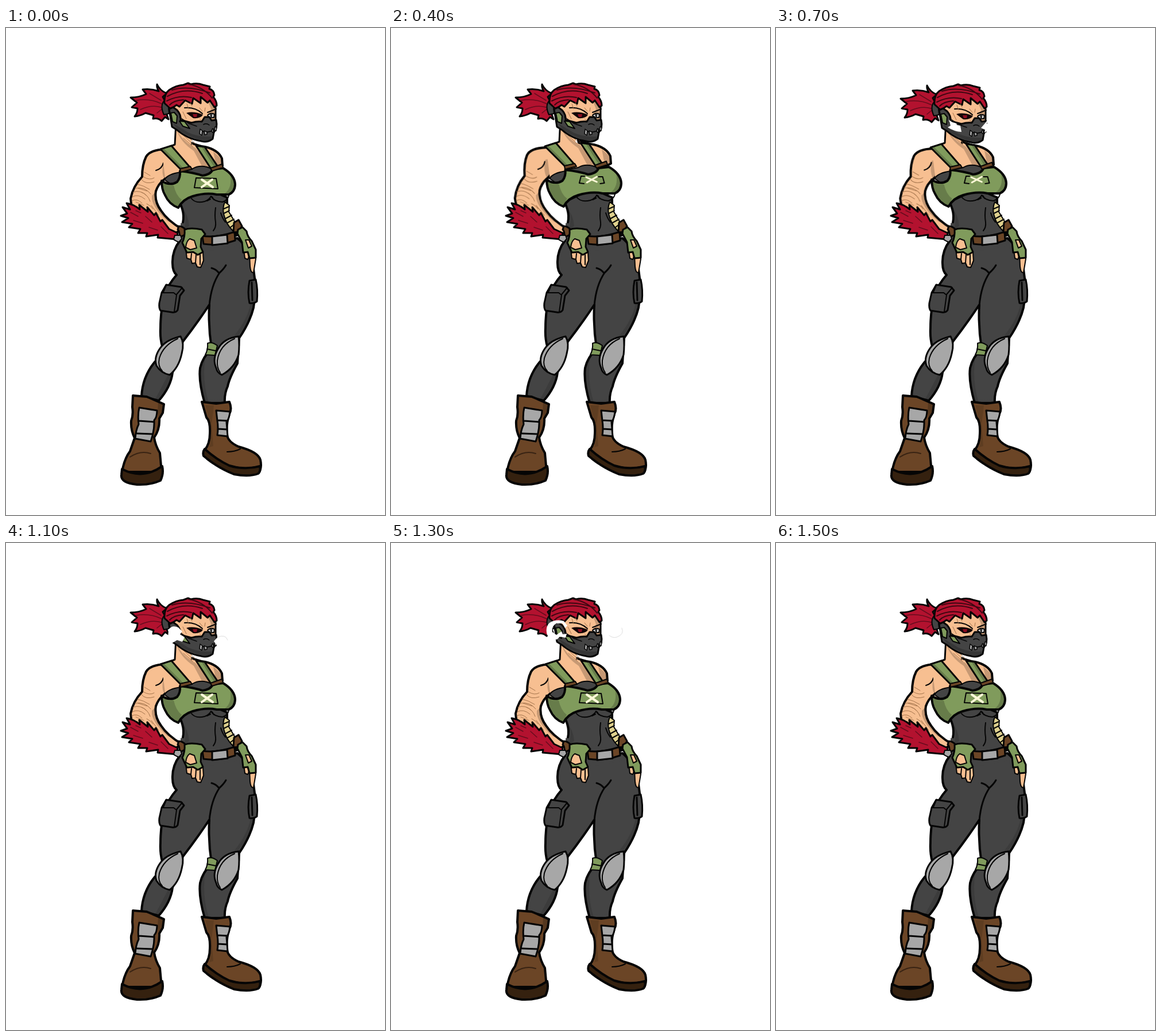
An HTML page that plays this animation: 660x848 px, repeating every 1600 ms.

```html
<!DOCTYPE html>
<html lang="en">
<head>
<meta charset="utf-8">
<title>Idle stance</title>
<style>
html, body { margin: 0; width: 100%; height: 100%; overflow: hidden; background: #fff; }
svg { display: block; width: 100vw; height: 100vh; }
path { stroke: #050505; stroke-width: 3; stroke-linejoin: round; stroke-linecap: round; fill: none; }
.skin { fill: #f7bf91; } .red { fill: #b3122f; } .suit { fill: #444; } .green { fill: #809b5c; }
.brown { fill: #6b4526; } .sole { fill: #35210f; } .steel { fill: #a7a7a7; } .wrap { fill: #dfd18e; }
.edge { stroke-width: 4; } .thin { stroke-width: 2; }
.fill, .shade, .smoke path { stroke: none; }
.shade { fill: #000; opacity: .2; }
.soft { opacity: .12; }
.hatch { stroke: #a4744c; stroke-width: 1; }
.crease { stroke: #650c1d; stroke-width: 1.5; }
.mark { stroke: #fff9d9; stroke-width: 4; }
.smoke path { fill: #fff; }
.smoke .wisp { fill: none; stroke: #ddd; stroke-width: 1; }

/* Every pose is held, then swapped */
.head, .arm, .chest, .far, .front, .rest, .rise, .smoke { animation: 1.6s step-end infinite; }
.head { animation-name: head; }
.arm { animation-name: arm; transform-origin: 218px 312px; }
.chest { animation-name: chest; }
.far { animation-name: far; }
.front { animation-name: front; transform-origin: 335px 280px; }
.rest { animation-name: rest; }
.rise { animation-name: rise; }
.smoke { visibility: hidden; }
.puff1 { animation-name: puff1; } .puff2 { animation-name: puff2; }
.puff3 { animation-name: puff3; } .puff4 { animation-name: puff4; }
.puff5 { animation-name: puff5; } .puff6 { animation-name: puff6; }
@keyframes head { 0%, 25%, 56.25% { transform: none } 12.5%, 43.75% { transform: translate(0, 2px) } }
@keyframes arm { 0%, 56.25% { transform: none } 12.5%, 43.75% { transform: skewX(2.5deg) scaleY(1.01) } 25% { transform: skewX(4.5deg) scaleY(1.03) } }
@keyframes chest { 0%, 56.25% { transform: none } 12.5%, 43.75% { transform: translate(0, -3px) } 25% { transform: translate(-1px, -5px) } }
@keyframes far { 0%, 56.25% { transform: none } 12.5%, 43.75% { transform: translate(2px, -2px) } 25% { transform: translate(6px, -4px) } }
@keyframes front { 0%, 56.25% { transform: none } 12.5%, 25%, 43.75% { transform: translate(1px, -2px) scale(1.015, 1) } }
@keyframes rest { 0%, 56.25% { visibility: visible } 12.5% { visibility: hidden } }
@keyframes rise { 0%, 56.25% { visibility: hidden } 12.5% { visibility: visible } }
@keyframes puff1 { 43.75% { visibility: visible } 56.25% { visibility: hidden } }
@keyframes puff2 { 56.25% { visibility: visible } 68.75% { visibility: hidden } }
@keyframes puff3 { 68.75% { visibility: visible } 75% { visibility: hidden } }
@keyframes puff4 { 75% { visibility: visible } 81.25% { visibility: hidden } }
@keyframes puff5 { 81.25% { visibility: visible } 87.5% { visibility: hidden } }
@keyframes puff6 { 87.5% { visibility: visible } 93.75% { visibility: hidden } }
</style>
</head>
<body>
<svg viewBox="0 0 660 848">

<!-- legs -->
<path class="suit edge" d="M303 370Q289 388 290 410Q290 424 297 430Q283 446 277 463Q269 490 269 522Q268 540 272 554L262 578Q238 605 236 641L266 649Q287 625 290 600L308 546Q332 515 354 482Q352 520 358 558Q342 574 338 592Q335 615 346 653L381 653Q380 637 386 624Q389 609 403 584L406 540Q425 512 431 487Q437 455 431 420Q427 386 403 366L345 376Z"/>
<path class="shade soft" d="M431 480Q425 512 403 537L398 535Q420 508 426 480ZM289 600Q284 628 265 648L260 646Q274 620 283 602ZM341 576Q334 605 347 652L353 652Q341 612 347 574Z"/>
<path d="M354 484Q357 448 372 426M358 418Q366 420 371 427Q379 420 383 413"/>
<path class="green thin" d="M351 549Q359 546 368 553L364 570L347 569Q352 560 351 549ZM350 559L365 562"/>
<path class="steel" d="M304 537Q278 543 268 558Q257 574 262 588Q270 601 285 604Q301 591 306 567Q311 549 304 537Z"/>
<path class="thin" d="M299 541Q274 552 267 575Q264 589 272 597"/>
<path class="steel" d="M405 537Q379 540 369 559Q359 576 366 592Q368 601 376 604Q398 592 405 569Q407 552 405 537Z"/>
<path class="thin" d="M398 541Q372 552 368 579Q367 592 373 600"/>
<path class="suit" d="M279 447L305 451L310 457L303 466L299 491Q296 496 289 495L269 492Q266 488 267 479L271 461Z"/>
<path class="thin" d="M271 461L292 461L297 465L293 494M279 448L274 460M297 464L307 452"/>
<path class="suit" d="M424 440L435 438Q439 456 437 476Q432 480 424 479Q420 461 424 440ZM428 443L429 474"/>

<!-- boots -->
<path class="brown edge" d="M221 640L245 642Q262 649 275 655L273 670L267 680Q268 699 258 713Q260 727 268 740L271 773L202 773Q206 750 216 737L224 714Q217 700 218 684Q222 674 220 660Z"/>
<path class="shade" d="M265 652L274 656L272 670L266 680L264 668Z"/>
<path class="sole edge" d="M202 768Q238 787 272 763Q275 776 269 788Q251 796 228 795Q199 792 201 778Z"/>
<path class="thin" d="M216 747Q234 735 252 741" style="stroke:#382313"/>
<path class="steel" d="M232 661L263 666Q263 678 258 683Q259 700 252 720L225 715Q226 700 231 690Q229 674 232 661ZM231 684L258 686M228 706L254 707"/>
<path class="brown edge" d="M341 651L366 654L389 651Q394 663 389 672Q383 689 385 709Q387 721 405 729Q439 738 443 752Q446 766 440 775L421 779Q382 775 350 750L346 735Q355 724 355 706Q356 685 349 678Z"/>
<path class="sole edge" d="M346 733Q367 752 389 762Q415 770 442 763Q444 772 439 776Q423 782 397 777Q367 765 344 745Q342 738 346 733Z"/>
<path class="shade soft" d="M347 657L362 657L358 690L361 728L354 730Q362 701 352 678Z"/>
<path class="thin" d="M385 738Q398 738 408 733"/>
<path class="steel" d="M366 666L390 668Q389 680 384 686L386 711L368 709Q370 696 368 684ZM368 683L386 684M369 698L385 699"/>

<!-- waist -->
<path class="suit edge" d="M302 303Q315 328 304 350L306 370L345 374L402 361Q384 330 385 295L350 280Z"/>
<path class="fill suit" d="M304 340L396 340L402 380L345 390L305 372Z"/>
<path class="shade soft" d="M306 312Q318 326 319 345L310 351Q316 329 306 312Z"/>
<path class="thin" d="M365 313Q363 327 365 338Q366 347 361 353M374 322Q377 332 382 338"/>
<path class="wrap thin" d="M381 303L389 309L388 320L400 340L395 353Q383 341 380 327Q376 315 381 303ZM379 315L388 311M379 323L389 318M382 332L393 326M386 339L397 333M391 347L400 340"/>
<path class="brown" d="M342 362Q365 366 398 355L399 370Q370 380 344 376Z"/>
<path class="steel" d="M359 363L385 360L386 375L359 378Z"/>

<!-- far hand -->
<path class="brown" d="M397 339L405 334L411 345L404 355L396 356Z"/>
<path class="skin thin" d="M414 386L416 401L421 403L424 395L425 415Q426 427 431 426L435 402L430 384Z"/>
<path class="green" d="M404 351L412 347L419 354Q420 363 428 371L435 386L435 400L424 401L421 390L413 391L411 373L403 358Z"/>
<path class="skin thin" d="M417 369L423 369L428 380L422 383Z"/>

<!-- near arm -->
<g class="arm">
<path class="skin edge" d="M278 211Q251 212 244 224Q237 238 237 259Q221 276 217 297L219 315L286 364L306 350Q281 335 270 318Q258 302 261 284Q265 272 275 264L300 250L300 215Z"/>
<path class="shade" d="M277 265Q269 253 275 232Q286 227 297 241L287 260ZM263 248L274 235Q272 246 263 248ZM261 285Q253 300 270 318L290 340L281 336Q252 310 254 292Z"/>
<path class="thin" d="M261 248Q272 245 274 235M283 237Q290 252 276 262"/>
<path class="hatch" d="M239 259Q250 266 258 261M236 264Q243 273 258 268M229 272Q239 274 250 281M225 279Q242 276 252 289M221 286Q234 281 245 292M220 294Q230 288 242 298M219 301Q228 296 237 305M241 251L251 257M236 286Q247 290 251 302M230 279L246 284M226 303L240 309M253 309L266 326M245 306Q253 310 256 315"/>
</g>
<path class="red" d="M297 368L264 365L265 360L244 363L246 357L230 357L234 350L214 347L220 341L202 338L213 331L200 327L211 323L203 312L216 316L210 305Q223 307 233 316L232 308L247 320L246 312L258 326L261 322L269 337L272 334L284 350L299 357Z"/>
<path class="crease" d="M217 321L230 328M222 335L238 340M243 328L254 338M249 347L264 352M270 346L282 358M226 318L235 322"/>
<path class="brown" d="M301 345Q307 345 313 351L311 360L302 365Q303 354 299 351Z"/>
<path class="steel thin" d="M294 361L304 361L306 367L301 373Q294 370 292 368Z"/>
<path class="skin thin" d="M313 385L315 401L322 403L324 410L330 409L333 416L339 417L344 405L343 390ZM322 403L323 393M330 409L331 395M338 412L338 395"/>
<path class="green" d="M311 351Q321 347 341 351L347 359L340 367L339 381L343 390L334 395L326 390L315 391L307 374Q312 363 311 351Z"/>
<path class="skin thin" d="M320 367L328 370L332 383L321 386L313 382Q314 371 320 367Z"/>

<!-- chest -->
<g class="far"><path class="skin edge" d="M320 199Q334 205 347 207Q369 212 376 227L377 240L357 250L330 250Z"/><path class="shade" d="M361 215L374 227L376 239L366 241Z"/></g>
<g class="chest">
<path class="fill skin" d="M296 165L294 204L271 212L278 268L310 268L355 250L344 214L322 204L326 170Z"/>
<path class="shade" d="M297 177Q309 199 330 209Q349 230 355 244L342 242L327 214Q303 198 297 177Z"/>
<path d="M296 165L294 203Q284 207 275 210"/>
<path class="hatch" d="M306 184L325 202M316 188L329 201M309 192L325 206"/>
</g>
<g class="front">
<path class="suit thin" d="M276 264Q282 254 304 251L304 262L290 274ZM303 249L325 245Q340 236 360 246L374 244L378 260L310 262Z"/>
<path class="green edge" d="M271 266Q285 276 298 268Q304 261 303 249Q328 252 342 257Q357 255 360 246L378 244Q398 256 399 272Q399 285 388 290L367 290Q348 286 325 293Q308 298 300 313Q284 307 277 291Q271 281 271 266Z"/>
<path class="shade" d="M272 269Q282 277 292 274Q296 292 306 299L300 311Q279 302 272 269ZM390 254Q399 262 398 273Q397 286 388 289L380 289Q395 279 390 254Z"/>
<path class="thin" d="M323 297Q330 306 346 302Q354 299 357 293Q362 302 377 303Q386 300 388 292M359 294L362 299M356 298L350 301"/>
<g class="rest">
<path class="thin" d="M331 261L366 262L369 280L328 278Z"/>
<path class="mark" d="M341 264L360 277M359 264L341 277"/>
</g>
<g class="rise">
<path class="thin" d="M336 260L330 260L327 272L335 273M360 261L367 261L370 272L363 273"/>
<path class="mark" d="M339 262L357 270M357 261L340 271" style="stroke-width:3"/>
</g>
</g>
<g class="chest">
<path class="green" d="M269 211L288 205L320 242L305 247Z"/>
<path class="green" d="M331 205L346 207L370 243L357 245Z"/>
<path class="shade" d="M270 212L275 210L309 244L305 245ZM341 208L346 208L368 242L363 243Z"/>
<path class="brown thin" d="M303 245L321 241L324 246L304 251ZM356 244L376 237L378 243L359 249Z"/>
</g>

<!-- head -->
<g class="head">
<path class="red" d="M277 127L273 120L280 114Q268 109 263 98Q262 104 266 110Q252 105 238 107L244 115Q232 121 217 121L228 130L219 138L229 140Q229 148 224 154Q234 153 243 148L257 152L256 158Q265 156 271 162L277 155L283 159L277 142Z"/>
<path class="crease" d="M227 126Q250 122 271 132M234 142Q253 133 270 138M250 114L270 126M263 148L273 140"/>
<path class="suit thin" d="M275 127Q268 136 275 151L284 149L282 127Z"/>
<path class="skin" d="M284 137Q297 114 326 111Q356 112 365 134L365 164L306 172L288 157Z"/>
<path class="shade" d="M349 121L362 131L364 162L350 158L357 141Z"/>
<path class="red" d="M276 131Q275 115 284 108Q296 100 309 99L317 96L322 98Q333 95 343 99L355 102L354 106Q362 108 363 117L361 120Q367 127 367 135L363 138L355 126L351 130L339 120L339 131L326 122L324 132L312 126L302 137L297 134L287 141Z"/>
<path class="crease" d="M281 119Q310 103 342 114M280 127Q301 116 323 121M289 108Q317 99 355 113M285 134Q292 126 309 125M318 98Q343 102 359 122" style="stroke:#3c0711;stroke-width:2"/>
<path class="thin" d="M311 139Q329 137 342 149M351 147L366 141"/>
<path class="fill" d="M314 148Q326 144 343 151Q339 158 326 157Z" style="fill:#130406"/>
<path class="fill" style="fill:#8a0c20" d="M325 150L333 150L332 155L327 155Z"/>
<path class="thin" style="fill:#ddd" d="M351 152Q355 147 363 150L362 156L354 156Z"/>
<path class="fill" style="fill:#333" d="M355 150L359 149L359 156L356 156Z"/>
<path class="hatch" d="M315 132L318 141M321 130L324 136M337 139L342 145M347 139L346 145M308 146L314 158M337 158L342 163"/>
<path class="suit" d="M284 141L291 138L298 143Q305 151 304 160L323 165Q333 162 341 163L346 155L354 155L358 161L366 160Q369 174 362 182L360 193Q351 200 340 197Q315 193 297 177L289 172Z"/>
<path class="shade" d="M291 166L311 178Q328 190 359 189L357 195Q337 200 300 178Z"/>
<path class="green thin" d="M287 148L293 147L298 153L297 166L290 163Z"/>
<path class="green thin" d="M302 162L311 163L320 175L308 171Z"/>
<path style="stroke-width:1.5" d="M302 155L318 166L332 171M344 168Q349 165 354 169M340 179Q350 184 363 177"/>
<path class="steel" style="stroke-width:1.5" d="M338 176L342 179L341 187L337 184ZM345 179L350 181L350 185L346 186ZM359 176L361 175L361 183L358 180ZM364 172L367 173L366 179L363 178Z"/>
</g>

<!-- breath -->
<g class="smoke puff1">
<path d="M301 160L307 164L314 166L315 169L321 170L323 181Q310 180 299 173L304 170ZM357 174L364 166L369 159L367 167L373 165L368 174L371 178L363 182L364 177Z"/>
</g>
<g class="smoke puff2">
<path d="M294 156L299 152L309 160L308 164L314 170L313 175L306 174L307 179Q294 177 293 169ZM354 177L363 171L371 164L368 172L377 170L368 177L366 182L363 177Z"/>
</g>
<g class="smoke puff3">
<path d="M283 151Q289 142 300 147L307 154L303 159L311 164L307 172L298 169L288 175L282 166ZM362 171L371 161L372 178L366 177Z"/>
<path class="wisp" d="M369 164Q382 158 386 169"/>
</g>
<g class="smoke puff4">
<path d="M274 153Q275 139 289 138Q302 136 308 149L304 154L296 146Q286 146 288 156L297 158L306 163L303 169L288 168Q276 165 274 153Z"/>
<path class="wisp" d="M393 153Q399 165 381 167M375 160Q378 169 385 167"/>
</g>
<g class="smoke puff5">
<path d="M272 160Q268 147 276 139Q287 132 301 136L307 144L303 148L299 140L288 140Q279 145 281 155L288 160L297 154L299 159L306 158L304 165L294 163L289 168Q276 168 272 160Z"/>
<path class="wisp" d="M402 148Q407 159 393 164Q386 166 380 161"/>
</g>
<g class="smoke puff6">
<path d="M271 155Q271 141 284 136L300 134L306 141L300 138L285 139Q275 144 275 158L283 166L278 166Z"/>
<path class="wisp" d="M403 150Q405 158 397 162"/>
</g>
</svg>
</body>
</html>
```
